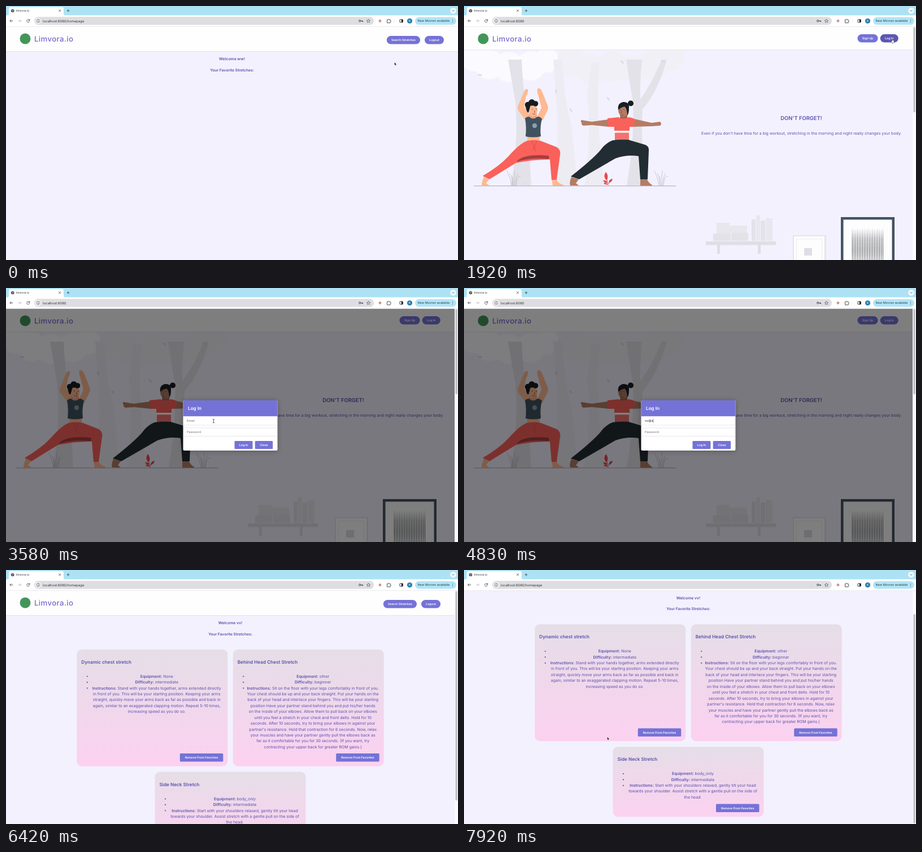
An HTML page that plays this animation: 800x450 px, repeating every 8 s.

```html
<!DOCTYPE html>
<html lang="en">
<head>
<meta charset="utf-8">
<title>limvora.io</title>
<style>
html, body { margin: 0; width: 100%; height: 100%; overflow: hidden; background: #f3f1fe; }
svg { display: block; width: 800px; height: 450px; font-family: Inter, "Open Sans", sans-serif; text-rendering: geometricPrecision; }
text { white-space: pre; }
</style>
</head>
<body>
<svg id="stage" viewBox="0 0 800 450" xmlns="http://www.w3.org/2000/svg"></svg>
<script>
const INK = '#5850ad', BTN = '#7572d7', LAV = '#f3f1fe';
const SKIN = '#ffb992', SKIN2 = '#b47c65', RED = '#fa615b', NAVY = '#222d33';
const BRAND = 'Limvora.io';
const CYCLE = 8000, STEP = 1000 / 12;

const rect = (x, y, w, h, fill, rx = 0, more = '') =>
  `<rect x="${x}" y="${y}" width="${w}" height="${h}" rx="${rx}" fill="${fill}" ${more}/>`;
const path = (d, fill, more = '') => `<path d="${d}" fill="${fill}" ${more}/>`;
const line = (d, color, w = 0.8) =>
  path(d, 'none', `stroke="${color}" stroke-width="${w}" stroke-linecap="round" stroke-linejoin="round"`);
const oval = (x, y, rx, ry, fill, more = '') =>
  `<ellipse cx="${x}" cy="${y}" rx="${rx}" ry="${ry}" fill="${fill}" ${more}/>`;
const dot = (x, y, r, fill, more) => oval(x, y, r, r, fill, more);
const text = (x, y, s, size, weight = 400, fill = INK, anchor = 'start', more = '') =>
  `<text x="${x}" y="${y}" font-size="${size}" font-weight="${weight}" fill="${fill}" text-anchor="${anchor}" ${more}>${s}</text>`;
const group = (id, body, more = '') => `<g id="${id}" ${more}>${body}</g>`;
const button = (x, y, w, h, label, rx, id = '') =>
  rect(x, y, w, h, BTN, rx, id && `id="${id}"`) +
  text(x + w / 2, y + h / 2 + 1.9, label, 5.2, 600, '#fff', 'middle');

function header(bottom) {
  return rect(0, 36, 800, bottom - 36, '#fefefe') + rect(0, bottom, 800, 0.8, '#e2e0ea') +
    dot(34, 58, 9.5, '#43965a') +
    text(50, 63, BRAND, 13.2, 500, '#7369cd', 'start', 'letter-spacing="0.4"');
}

// ---------- browser frame ----------
function browser() {
  const ink = '#3c4043';
  return rect(0, 0, 800, 18, '#ade2f5') +
    path('M2 17 Q5 17 5 14 V5 Q5 2 8 2 H99 Q102 2 102 5 V14 Q102 17 105 17Z', '#fff') +
    rect(0, 16.5, 800, 20, '#fff') + rect(0, 36, 800, 0.7, '#e4e4ea') +
    dot(11.7, 8.3, 2.9, '#4a4d52') + line('M10.2 7.2 L12 8.4 L11.3 10 M12.6 6.6 L13.6 7.6', '#dfe1e4', 0.8) +
    text(18, 10.2, 'limvora.io', 5.1, 400, '#333') +
    line('M93.6 6.8 l3 3 m0 -3 l-3 3', ink) +
    line('M108 8.3 h4 m-2 -2 v4', ink) +
    dot(791.5, 8.3, 5.3, '#f4fbfd') + line('M789.8 7.6 l1.7 1.7 l1.7 -1.7', ink) +
    line('M12 26.3 H7 m2.2 -2.2 l-2.2 2.2 l2.2 2.2', ink) +
    line('M21.5 26.3 h5 m-2.2 -2.2 l2.2 2.2 l-2.2 2.2', '#b4b6ba') +
    line('M41.4 25.2 A2.5 2.5 0 1 0 41.6 27.2 M41.8 23.5 v2 h-2', ink) +
    rect(50, 19.2, 601, 14.4, '#dedee2', 7.2) + dot(57, 26.4, 5, '#f6f6f8') +
    line('M57 26 v2.2', ink) + dot(57, 24.3, 0.5, ink) +
    dot(57, 26.4, 2.9, 'none', `stroke="${ink}" stroke-width="0.6"`) +
    text(65, 28.5, '', 5.9, 400, '#35373b', 'start', 'id="url"') +
    dot(626.2, 26.4, 1.6, 'none', `stroke="${ink}" stroke-width="1"`) + line('M628 26.4 h3.6 v1.4 m-1.5 -1.4 v1.2', ink, 0.9) +
    path('M641.5 23.2 l.9 2.1 2.3 .2 -1.7 1.5 .5 2.2 -2 -1.2 -2 1.2 .5 -2.2 -1.7 -1.5 2.3 -.2Z', 'none', `stroke="${ink}" stroke-width="0.6"`) +
    dot(662, 26.5, 2.4, '#d0958b') +
    path('M674.5 24.4 h1.8 a1.1 1.1 0 0 1 2.2 0 h1.7 v1.7 a1.1 1.1 0 0 1 0 2.2 v1.6 h-5.7Z', 'none', `stroke="${ink}" stroke-width="0.9"`) +
    rect(687.5, 23.5, 0.5, 6, '#cfe5ef') +
    rect(697, 23.9, 5.3, 5, 'none', 0.6, 'stroke="#222" stroke-width="0.9"') + rect(699.8, 23.9, 2.5, 5, '#222') +
    dot(714.5, 26.5, 4.6, '#2c7fae') + text(714.5, 28.3, 'K', 5, 500, '#e8f4fa', 'middle') +
    rect(724, 19.8, 73, 13.4, '#b1e4f6', 6.7) +
    text(728.5, 28.4, 'New Movren available', 5.45, 400, '#23404d') +
    [24.3, 26.5, 28.7].map(y => dot(790.5, y, 0.55, '#23404d')).join('');
}

// ---------- landing illustration ----------
function forest() {
  const blobs = [[18, 92, 24], [45, 104, 26], [80, 108, 27], [118, 106, 26], [146, 96, 22]];
  const crown = [[190, 100, 26], [225, 112, 27], [262, 108, 28], [300, 112, 25], [335, 104, 27], [366, 92, 23]];
  const leaf = (x, y, a) => path('M-4 0 Q0 -4 5 1 Q0 3 -4 0Z', '#dddce4', `transform="translate(${x} ${y}) rotate(${a})"`);
  const grass = x => [-12, -7, -3, 2, 7, 12].map((d, i) =>
    line(`M${x + d / 3} 318 Q${x + d / 2} ${304 - i % 2 * 7} ${x + d} ${292 + i % 3 * 5}`, '#a3a2ac', 0.5)).join('');
  return blobs.map(b => dot(...b, '#fbfafe')).join('') +
    crown.map(b => dot(...b, '#f1f0f6')).join('') +
    path('M158 95 H174 Q176 160 190 210 L201 318 H157 Q168 250 165 190Z M226 100 H240 Q232 190 248 318 H214 Q226 220 218 160Z', '#edecf3') +
    path('M78 95 H102 Q104 145 111 185 L119 318 H83 Q97 240 91 170Z', '#e3e2e8') +
    path('M287 95 H315 Q311 135 312 165 Q330 142 350 95 H359 Q344 150 316 183 Q312 260 325 318 H288 Q302 240 299 170Z', '#e3e2e8') +
    leaf(28, 122, 0) + leaf(255, 164, 40) + leaf(189, 184, 50) + leaf(280, 99, 40) + leaf(163, 151, 65) + leaf(352, 98, 20) +
    grass(88) + grass(349);
}

function yogaLeft() {
  return path('M109 202 L96 185 Q94 180 97 174 L107 150 Q110 145 113 148 Q114 153 110 159 L106 178 L119 198Z', SKIN) +
    path('M129 198 L137 180 L131 157 Q128 148 131 146 Q135 145 138 151 L148 176 Q150 181 147 186 L139 203Z', SKIN) +
    path('M115 186 H129 V199 Q122 204 115 198Z', '#f4a47e') +
    oval(122, 185, 8, 10.5, SKIN) +
    dot(113, 175, 5.2, '#171c20') + dot(120, 171, 5.8, '#171c20') + dot(126.5, 173, 4.8, '#171c20') +
    path('M109 176 L117 179 L114 189 Q110 188 109 176Z', '#171c20') +
    line('M120 183 l2 -.5 m5 0 l2 .5 M125 185 v4 M121 191 q3 2 5 0', '#5a3930', 0.7) +
    path('M112 228 H134 V241 H112Z', SKIN) +
    path('M108 199 Q111 196 115 196 Q122 203 130 196 Q135 196 138 200 Q134 215 136 231 Q122 234 109 231 Q111 215 108 199Z', '#3f5260') +
    dot(125, 212, 4.2, '#8f9ea8') +
    path('M111 239 Q124 236 136 239 L164 250 Q172 255 170 264 L164 308 H155 L152 272 Q120 272 92 278 L45 307 L33 301 Q62 284 78 267 Q98 244 111 239Z', RED) +
    path('M93 276 Q104 261 149 265 Q153 269 149 271 Q117 268 93 276Z', '#a53e40') +
    line('M120 239 q4 9 7 18 M128 239 q-1 9 -6 15', '#c94a48', 0.7) +
    path('M35 302 L44 307 L39 314 L45 318 H32 Q30 316 33 309Z', SKIN) +
    path('M155.5 308 H164 Q166 314 176 317 V318.5 H157Z', SKIN);
}

function yogaRight() {
  return path('M255 201 L226 205 L208 202 Q205 205 209 207 Q206 209 211 212 L227 211 L257 214Z', SKIN2) +
    path('M301 200 L332 207 L347 205 Q351 209 347 212 L332 213 L300 214Z', SKIN2) +
    path('M277 188 H289 V199 Q283 203 276 199Z', '#9c6753') +
    oval(282, 185, 9, 11, SKIN2) +
    path('M273 184 Q271 172 282 170 Q293 170 292 181 Q292 190 289 194 Q289 182 284 178 Q277 180 273 184Z', '#191d22') +
    dot(295, 172.5, 5.1, '#191d22') +
    line('M276 184 l2 -.6 m4 0 l2 .5 M279 186 l-1 4 M278 193 q2 1 4 0', '#533328', 0.7) +
    path('M267 222 H292 V239 H267Z', '#f17470') +
    path('M254 199 Q265 198 273 197 Q282 202 291 197 Q301 198 303 202 L300 214 L293 214 V222 H266 V214 L255 214Z', RED) +
    rect(266, 221, 27, 3.4, '#fff') +
    path('M263 238 Q277 236 291 237 L321 246 Q328 249 327 257 L325 307 H312 L309 266 Q288 263 268 270 L204 307 L189 302 Q226 273 241 256 Q250 243 263 238Z', NAVY) +
    path('M190 303 L203 307 L198 314 L203 318 H188 Q186 313 190 303Z', SKIN2) +
    path('M312 307 H324 Q327 314 333 317 V318.5 H312Z', SKIN2);
}

function plant() {
  const leaf = (x, y, a, s = 1) => path('M0 0 Q-6 -7 0 -15 Q6 -7 0 0Z', '#e9474a', `transform="translate(${x} ${y}) rotate(${a}) scale(${s})"`);
  return line('M255 318 L252 303 M255 315 L262 309', '#b13338', 0.8) +
    leaf(252, 309, -4) + leaf(254, 313, -62, 0.6) + leaf(256, 313, 45, 0.65) + leaf(254, 316, -70, 0.5);
}

function room() {
  const books = [[441, 403, 31, 13], [447, 384, 23, 19], [473, 402, 30, 14], [470, 389, 31, 13], [509, 378, 7, 38], [517, 371, 7, 45], [525, 380, 8, 36], [534, 376, 12, 40]];
  let s = books.map(([x, y, w, h], i) => rect(x, y, w, h, i % 2 ? '#e8e7ed' : '#e3e2e9')).join('') +
    rect(428, 417, 124, 6.5, '#dfdee5') + rect(448, 423, 5, 16, '#dfdee5') + rect(520, 423, 5, 16, '#dfdee5') +
    rect(582, 406, 59, 50, '#e5e4ea') + rect(584, 408, 54, 50, '#fdfdfe') +
    rect(588.5, 413, 45, 45, 'none', 0, 'stroke="#e8e7ed" stroke-width="0.8"') + rect(602, 429, 14, 13, '#dedde4') +
    rect(667, 374, 95, 90, '#455361') + rect(671.5, 378.5, 86, 90, '#fdfdfe');
  for (let i = 0; i < 19; i++) {
    const x = 687 + i * 3, top = 393 + i % 3;
    s += path(`M${x} ${top} Q${x + 1.3} 422 ${x + 0.6} 452 H${x} Q${x - 0.4} 422 ${x} ${top}Z`, '#404448');
  }
  return s;
}

function landing() {
  return rect(0, 36, 800, 414, LAV) + forest() + room() + yogaLeft() + yogaRight() + plant() +
    line('M18 318.8 H375', '#8a8992', 0.7) +
    text(597, 202, "DON'T FORGET!", 9.4, 600, INK, 'middle') +
    text(597.3, 228.4, "Even if you don't have time for a big workout, stretching in the morning and night really changes your body.", 7, 400, INK, 'middle') +
    header(77.5) +
    button(696.5, 50, 36, 14.6, 'Sign Up', 7.3) + button(736.7, 50, 32, 14.6, 'Log In', 7.3, 'loginBtn');
}

function dialog() {
  return rect(0, 36.5, 794, 414, '#000', 0, 'opacity="0.5"') +
    rect(313.5, 199.5, 167, 90, '#000', 3, 'opacity="0.25" filter="url(#soft)"') +
    rect(313.5, 199, 167, 89, '#fff', 2) +
    path('M313.5 227.3 V201 Q313.5 199 315.5 199 H478.5 Q480.5 199 480.5 201 V227.3Z', BTN) +
    text(322, 216, 'Log In', 8.2, 600, '#fff') +
    [242.6, 247.6, 262].map(y => rect(313.5, y, 167, 0.7, '#dcdbe3')).join('') +
    text(320, 237.3, '', 5.5, 400, '#222', 'start', 'id="mail"') +
    text(320, 256.5, '', 5.4, 400, '#222', 'start', 'id="pass"') +
    rect(320, 232, 0.6, 6.5, '#222', 0, 'id="caret"') +
    button(404.5, 271, 32, 14.3, 'Log In', 1.5) + button(440.7, 271, 31.5, 14.3, 'Close', 1.5);
}

// ---------- home page ----------
function card(x, y, h, title, gear, level, words) {
  const mid = x + 141.5, top = y + 50, gap = 10.43;
  const rows = [['Equipment:', gear], ['Difficulty:', level], ['Instructions:', words[0]]];
  return rect(x, y, 267, h, 'url(#pink)', 9) +
    text(x + 8, y + 24.8, title, 8.2, 600) +
    rows.map(([k, v], i) => dot(x + 18.5, top + i * gap - 2.2, 1.1, INK) +
      text(mid, top + i * gap, `<tspan font-weight="600">${k}</tspan> ${v}`, 7, 400, INK, 'middle')).join('') +
    words.slice(1).map((s, i) => text(mid, top + (i + 3) * gap, s, 7, 400, INK, 'middle')).join('') +
    button(x + 182.5, y + h - 22.6, 76.5, 14.4, 'Remove From Favorites', 1.5);
}

const greeting = (x, name) =>
  text(x, 96.4, `Welcome ${name}!`, 6.8, 600, INK, 'middle') +
  text(x, 115.9, 'Your Favorite Stretches:', 6.7, 600, INK, 'middle');

function home(shift, name, cards, id) {
  return rect(0, 36, 800, 500, LAV) + header(80) +
    button(673.8 - shift, 53, 59.2, 14.6, 'Search Stretches', 7.3) +
    button(741 - shift, 53, 34, 14.6, 'Logout', 7.3, id) +
    greeting(400 - shift / 2, name) + cards;
}

const cards =
  card(125.3, 140.7, 207, 'Dynamic chest stretch', 'None', 'intermediate', [
    'Stand with your hands together, arms extended directly',
    'in front of you. This will be your starting position. Keeping your arms',
    'straight, quickly move your arms back as far as possible and back in',
    'again, similar to an exaggerated clapping motion. Repeat 5-10 times,',
    'increasing speed as you do so.']) +
  card(401.7, 140.7, 207, 'Behind Head Chest Stretch', 'other', 'beginner', [
    'Sit on the floor with your legs comfortably in front of you.',
    'Your chest should be up and your back straight. Put your hands on the',
    'back of your head and interlace your fingers. This will be your starting',
    'position Have your partner stand behind you and put his/her hands',
    'on the inside of your elbows. Allow them to pull back on your elbows',
    'until you feel a stretch in your chest and front delts. Hold for 10',
    'seconds. After 10 seconds, try to bring your elbows in against your',
    "partner's resistance. Hold that contraction for 6 seconds. Now, relax",
    'your muscles and have your partner gently pull the elbows back as',
    'far as it comfortable for you for 30 seconds. (If you want, try',
    'contracting your upper back for greater ROM gains.)']) +
  card(263.5, 357.7, 124, 'Side Neck Stretch', 'body_only', 'intermediate', [
    'Start with your shoulders relaxed, gently tilt your head',
    'towards your shoulder. Assist stretch with a gentle pull on the side of',
    'the head.']);

const pointer =
  group('arrow', path('M0 0 V5.8 L1.3 4.6 L2.2 6.6 L3.1 6.2 L2.2 4.3 H4Z', '#111', 'stroke="#fff" stroke-width="0.5"')) +
  group('hand', path('M-.7 0 Q0 -1 .7 0 V2.4 Q2.6 2.2 3.2 3.4 V5.4 Q3 7.2 1.8 7.5 H-.6 Q-1.8 6.6 -2.6 4.4 Q-2.3 3.3 -.7 4.4Z', '#fff', 'stroke="#222" stroke-width="0.6"')) +
  group('beam', line('M-1.2 -3.3 Q0 -3.3 0 -2.4 V2.4 Q0 3.3 -1.2 3.3 M1.2 -3.3 Q0 -3.3 0 -2.4 M0 2.4 Q0 3.3 1.2 3.3', '#222', 0.7));

document.getElementById('stage').innerHTML =
  '<defs><linearGradient id="pink" x1="0" y1="0" x2="0" y2="1"><stop offset="0" stop-color="#e5dee7"/><stop offset="1" stop-color="#fcd1f0"/></linearGradient>' +
  '<filter id="soft" x="-20%" y="-20%" width="140%" height="150%"><feGaussianBlur stdDeviation="4"/></filter></defs>' +
  group('empty', home(0, 'ww', '', 'logoutBtn')) +
  group('front', landing()) +
  group('full', home(6, 'vv', cards, '')) +
  group('modal', dialog()) +
  group('bar', rect(794, 36.5, 6, 414, '#fafafb') + rect(795.4, 37.5, 3.4, 151, '#bfbfc4', 1.7, 'id="thumb"')) +
  browser() + group('mouse', pointer);

// ---------- motion ----------
const el = {};
document.querySelectorAll('[id]').forEach(n => el[n.id] = n);
const show = (n, on) => n.setAttribute('display', on ? 'inline' : 'none');
const clamp = v => Math.max(0, Math.min(1, v));
const ease = v => v * v * (3 - 2 * v);
const ramp = (t, a, b) => ease(clamp((t - a) / (b - a)));
const at = (table, t) => table.filter(r => r[0] <= t).pop();

const track = [[0, 687.5, 99.5], [670, 757, 60], [1000, 758.5, 63.5], [1090, 758.5, 63.5], [1330, 758, 58.3],
  [2990, 758, 58.3], [3500, 367.5, 235.7], [6500, 367.5, 235.7], [6920, 253.5, 295.5], [8000, 253.5, 295.5]];
const kinds = [[0, 'arrow'], [580, 'hand'], [3080, 'arrow'], [3400, 'beam'], [4160, ''], [6580, 'arrow']];
const mailSteps = [[0, 'Email'], [4160, 'v'], [4490, 'vv'], [4580, 'vv@'], [4825, 'vv@v'], [4990, 'vv@vv']];
const passSteps = [[0, 'Password'], [5580, '•'], [5660, '••'], [5825, '•••']];

function mouseAt(t) {
  const i = Math.max(1, track.findIndex(p => p[0] > t));
  const [t0, x0, y0] = track[i - 1], [t1, x1, y1] = track[i];
  const k = ramp(t, t0, t1);
  return [x0 + (x1 - x0) * k, y0 + (y1 - y0) * k];
}

function tint(n, k) {
  const a = [117, 114, 215], b = [91, 87, 178];
  n.setAttribute('fill', `rgb(${a.map((v, i) => Math.round(v + (b[i] - v) * k))})`);
}

function field(n, table, t) {
  const s = at(table, t)[1];
  n.textContent = s;
  n.setAttribute('fill', s === table[0][1] ? '#73727c' : '#222');
}

function draw(time) {
  const t = Math.floor((time + 4) / STEP) * STEP % CYCLE + 0.01;
  const onEmpty = t < 999, onFull = t >= 6245, onFront = !onEmpty && !onFull;
  show(el.empty, onEmpty);
  show(el.front, onFront);
  show(el.full, onFull);
  show(el.bar, !onEmpty);
  el.url.textContent = 'localhost:8080' + (onFront ? '' : '/homepage');

  tint(el.logoutBtn, ramp(t, 580, 750));
  tint(el.loginBtn, ramp(t, 1090, 1330) - ramp(t, 3000, 3250));

  const open = onFront ? ramp(t, 2960, 3250) : 0;
  show(el.modal, open > 0);
  el.modal.setAttribute('opacity', open);
  field(el.mail, mailSteps, t);
  field(el.pass, passSteps, t);
  const typed = t < 4160 ? 0 : at(mailSteps, t)[1].length;
  const caretX = 320 + typed * 3.1 + (typed > 2 ? 2.1 : 0);
  el.caret.setAttribute('x', caretX);
  show(el.caret, t >= 3910 && t < 5245);

  const k = ramp(t, 6900, 7650);
  el.full.setAttribute('transform', `translate(0 ${-44.5 * k})`);
  el.thumb.setAttribute('y', onFull ? 37.5 + 40.5 * k : 37.5);
  el.thumb.setAttribute('height', onFull ? 371 : 151);

  const [x, y] = mouseAt(t), kind = at(kinds, t)[1];
  el.mouse.setAttribute('transform', `translate(${x} ${y})`);
  ['arrow', 'hand', 'beam'].forEach(n => show(el[n], n === kind));
}

const start = performance.now();
function tick(now) {
  draw(Math.max(0, now - start) % CYCLE);
  requestAnimationFrame(tick);
}
draw(0);
requestAnimationFrame(tick);
</script>
</body>
</html>
```
